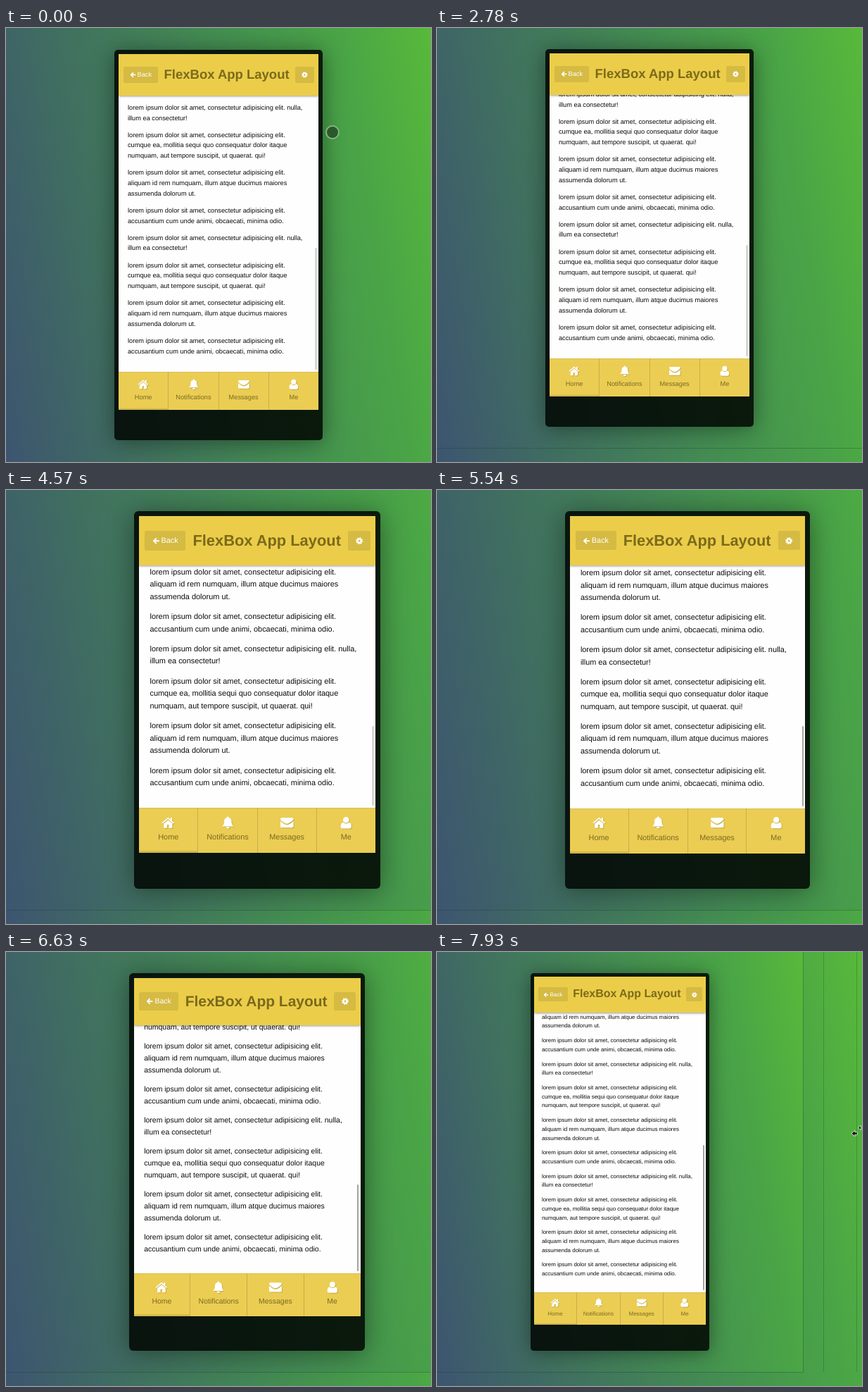
Animation of 604x616 px, one loop 8 s. Source, as an HTML page:

```html
<!DOCTYPE html>
<html lang="en">
<head>
<meta charset="utf-8">
<title>Flexbox app layout</title>
<style>
  :root {
    --sky: linear-gradient(80deg, #3d5570 0%, #406f60 25%, #448f51 58%, #4aa546 82%, #58b93a 100%);
  }
  html, body { margin: 0; width: 100%; height: 100%; overflow: hidden; }
  body { font-family: "Liberation Sans", Arial, Helvetica, sans-serif; text-rendering: geometricPrecision; }
  #stage { position: relative; width: 604px; height: 616px; overflow: hidden; background: var(--sky); }
  #win { position: absolute; left: 0; top: 0; background: var(--sky); box-shadow: 0 0 0 1px rgba(10, 60, 30, .3); }
  .edge { position: absolute; top: 0; width: 1px; height: 596px; background: rgba(10, 60, 30, .25); }

  /* everything in the phone scales with its font size */
  #phone {
    position: absolute; left: 50%; top: 5%; width: 32em; height: 90%; margin-left: -16em;
    border-radius: .55em; background: rgba(0, 5, 2, .86);
    box-shadow: 0 .3em 3.5em rgba(0, 0, 0, .42);
  }
  .screen {
    position: absolute; left: .65em; right: .65em; top: .65em; bottom: 4.65em;
    display: flex; flex-direction: column; overflow: hidden; background: #fefefe;
  }
  header {
    position: relative; z-index: 1; flex: none; height: 6.4em; box-sizing: border-box;
    padding: 0 .65em 0 .75em; display: flex; align-items: center; justify-content: space-between;
    background: #ebcd49; box-shadow: 0 1px 3px rgba(0, 0, 0, .4);
  }
  h1 { margin: 0; font-size: 2em; line-height: 1; white-space: nowrap; color: #7b6a1b; }
  .btn {
    height: 2.5em; width: 2.9em; display: flex; align-items: center; justify-content: center;
    border-radius: .25em; background: #d5ba43; color: #fff;
  }
  .back { width: 5.3em; }
  .btn svg { width: .95em; height: .95em; }
  .back svg { margin-right: .2em; }
  main { position: relative; flex: 1; overflow: hidden; }
  #text { position: absolute; left: 1.4em; bottom: 2.35em; line-height: 1.6em; white-space: nowrap; color: #0c0c0c; }
  #text p { margin: 1em 0 0; }
  #thumb { position: absolute; right: 2.5px; bottom: 3px; width: 1.7px; border-radius: 1px; background: #a3a5a0; }
  footer { flex: none; height: 5.85em; display: flex; background: #ebcd54; box-shadow: inset 0 1px 0 #d9bf55; }
  .tab { position: relative; flex: 1; box-sizing: border-box; text-align: center; color: #7a6a20; }
  .tab + .tab { border-left: 1px solid #c8ae49; }
  .tab:first-child { box-shadow: inset 0 -.25em #d0b64c; }
  .tab svg {
    position: absolute; left: 50%; top: 1.05em; width: 1.7em; height: 1.7em; margin-left: -.85em;
    filter: drop-shadow(1px 1px 0 rgba(140, 118, 30, .4));
  }
  .tab span { position: absolute; left: 0; right: 0; top: 3.3em; line-height: 1.2em; }
  svg { fill: #fff; overflow: visible; }

  #touch {
    position: absolute; width: 16px; height: 16px; margin: -10px; border-radius: 50%;
    border: 2px solid #86b386; background: #29592a;
  }
  .cursor { position: absolute; width: 9px; height: 9px; margin: -4.5px; }
  .cursor path { fill: #111; stroke: #fff; stroke-width: 1.2; paint-order: stroke; }
</style>
</head>
<body>
<div id="stage">
  <div class="edge" data-from="7430" style="left:596px"></div>
  <div class="edge" data-from="7760" style="left:549px"></div>
  <div id="win">
    <div id="phone">
      <div class="screen">
        <header>
          <div class="btn back">
            <svg viewBox="0 0 16 16"><path d="M8 1 1 8l7 7 2-2-3.4-3.5H15v-3H6.600L10 3z"/></svg>
            <span>Back</span>
          </div>
          <h1>FlexBox App Layout</h1>
          <div class="btn">
            <svg viewBox="0 0 16 16">
              <circle cx="8" cy="8" r="4.200" fill="none" stroke="#fff" stroke-width="3.800"/>
              <circle cx="8" cy="8" r="6.800" fill="none" stroke="#fff" stroke-width="2.200" stroke-dasharray="2.670"/>
            </svg>
          </div>
        </header>
        <main><div id="text"></div><div id="thumb"></div></main>
        <footer id="tabs"></footer>
      </div>
    </div>
  </div>
  <div id="touch"></div>
  <svg class="cursor" data-from="7150" style="left:602.5px;top:249px" viewBox="0 0 9 9"><path d="M1 4.500 4 2v5z"/></svg>
  <svg class="cursor" data-from="7430" style="left:593px;top:257px" viewBox="0 0 9 9"><path d="M.5 4.500 4.500 1v2.200H8v2.600H4.500V8z"/></svg>
</div>
<script>
  const LOOP = 8000;
  const $ = id => document.getElementById(id);

  // time, window width
  const widths = [
    [0, 604], [3970, 614], [4160, 628], [4180, 637], [4400, 686], [4540, 705], [4570, 714],
    [5540, 712], [5650, 710], [5910, 708], [6110, 704], [6320, 701], [6480, 695], [6630, 685],
    [6760, 650], [6920, 637], [7150, 602], [7430, 596], [7630, 580], [7760, 549], [7930, 520]
  ];
  const heights = [[0, 616], [230, 596]];

  // time, x, y of the touch point
  const touches = [
    [0, 464, 148], [230, 412, 11], [500, 467, 8],
    [1600, 486, 28], [1700, 514, 62], [1790, 544, 104], [1890, 571, 145], [1990, 590, 174],
    [2190, 592, 188], [2290, 594, 204], [2380, 597, 219], [2480, 600, 232], [2570, 602, 240],
    [2780, 700, 240]
  ];

  const lead = "lorem ipsum dolor sit amet, consectetur adipisicing elit.";
  const paragraphs = [
    " nulla,<br>illum ea consectetur!",
    "<br>cumque ea, mollitia sequi quo consequatur dolor itaque<br>numquam, aut tempore suscipit, ut quaerat. qui!",
    "<br>aliquam id rem numquam, illum atque ducimus maiores<br>assumenda dolorum ut.",
    "<br>accusantium cum unde animi, obcaecati, minima odio."
  ];
  $("text").innerHTML = paragraphs.map(p => `<p>${lead}${p}</p>`).join("").repeat(3);

  const tabs = {
    Home: "M8 1.500.5 8l1 1L8 3.500 14.500 9l1-1-2.500-2.200V2h-2v2zM8 4.700 2.800 9v5.500h4v-4h2.400v4h4V9z",
    Notifications: "M8 .5c-.8 0-1.200.5-1.200 1.300C4.500 2.400 3.500 4 3.500 6.500c0 3-.8 4.700-2.500 6h14c-1.700-1.300-2.500-3-2.500-6 0-2.500-1-4.100-3.300-4.700C9.200 1 8.800.5 8 .5zM6 13.200a2 2 0 0 0 4 0z",
    Messages: "M0 3.500Q0 2 1.500 2h13Q16 2 16 3.500c0 1.500-5.500 5.800-8 5.800S0 5 0 3.500zM0 6c2 2 5.500 4.700 8 4.700S14 8 16 6v6.500q0 1.500-1.500 1.500h-13Q0 14 0 12.500z",
    Me: "M8 .8a3.700 3.700 0 1 1 0 7.400 3.700 3.700 0 0 1 0-7.400zM4.300 7.500C6.500 9.600 9.500 9.600 11.700 7.500 13.800 8.200 14.500 10 14.500 12.500q0 2.500-2.500 2.500H4q-2.500 0-2.500-2.500C1.500 10 2.200 8.200 4.300 7.500z"
  };
  $("tabs").innerHTML = Object.entries(tabs).map(([name, d]) =>
    `<div class="tab"><svg viewBox="0 0 16 16"><path d="${d}"/></svg><span>${name}</span></div>`).join("");

  const timed = [...document.querySelectorAll("[data-from]")];
  const at = (steps, t) => steps.findLast(s => s[0] <= t);

  function draw(t) {
    const w = at(widths, t)[1], h = at(heights, t)[1];
    const em = w * .49 / 32;
    $("win").style.width = w + "px";
    $("win").style.height = h + "px";
    $("phone").style.fontSize = em + "px";

    const view = h * .9 - 17.55 * em;
    $("thumb").style.height = view * view / (96 * em) + "px";

    const [, x, y] = at(touches, t);
    $("touch").style.left = x + "px";
    $("touch").style.top = y + "px";
    for (const el of timed) el.style.display = t >= +el.dataset.from ? "" : "none";
  }

  const start = performance.now();
  function tick() {
    draw((performance.now() - start) % LOOP);
    requestAnimationFrame(tick);
  }
  tick();
</script>
</body>
</html>
```
